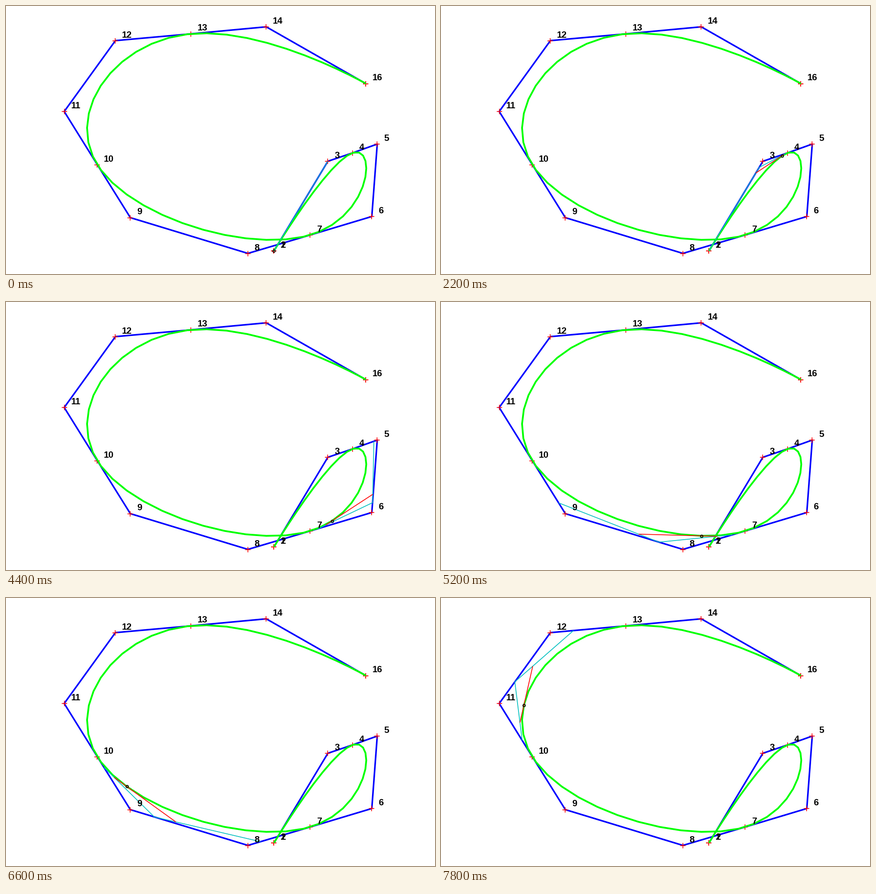
A matplotlib script that plays this animation: 947 by 592 pixels, repeating every 8000 ms.

```python
import matplotlib.pyplot as plt
import numpy as np
from matplotlib.animation import FuncAnimation

W, H, DPI = 947, 592, 64
FRAMES, INTERVAL = 40, 200
PX = 72 / DPI  # points per pixel

# Control points of five joined cubic Bezier pieces, in pixels
CTRL = np.array([
    (591, 540.5), (591, 540.5), (710, 342.5), (764.5, 324), (819, 304.5),
    (807, 464.5), (670.5, 505.5), (533.5, 546), (274, 467), (201, 350),
    (128, 232.5), (241, 76), (408, 61), (574, 45.5), (794, 171), (794, 171),
])
PIECES = (len(CTRL) - 1) // 3
PARAMS = np.linspace(0, PIECES, 60)


def reduce_once(pts, t):
    return (1 - t) * pts[:-1] + t * pts[1:]


def casteljau(s):
    """Construction points at global parameter s: 3, 2 and 1 of them."""
    piece = min(int(s), PIECES - 1)
    t = s - piece
    first = reduce_once(CTRL[3 * piece:3 * piece + 4], t)
    second = reduce_once(first, t)
    return first, second, reduce_once(second, t)


fig = plt.figure(figsize=(W / DPI, H / DPI), dpi=DPI, facecolor="white")
ax = fig.add_axes([0, 0, 1, 1])
ax.set_xlim(-0.5, W - 0.5)
ax.set_ylim(H - 0.5, -0.5)
ax.axis("off")


def line(pts, color, width, z):
    return ax.plot(pts[:, 0], pts[:, 1], color=color, lw=width * PX, zorder=z,
                   solid_joinstyle="round", solid_capstyle="butt")[0]


line(CTRL, "#0000ff", 3.5, 1)
ax.plot(CTRL[:, 0], CTRL[:, 1], ls="", marker="+", ms=12 * PX,
        mew=1.6 * PX, color="#ff0000", zorder=2)
line(np.array([casteljau(s)[2][0] for s in PARAMS]), "#00ff00", 3.9, 3)

for n, (x, y) in enumerate(CTRL, 1):
    if n == 15:  # covered by the last label
        continue
    dx = 20.2 if n < 10 else 25.3
    ax.text(x + dx, y - 7, str(n), ha="center", va="baseline", zorder=7,
            family="Liberation Sans", weight="bold", size=20 * PX)

outer = line(CTRL[:3], "#00bfbf", 1.7, 4)
inner = line(CTRL[:2], "#ff0000", 1.7, 5)
dot, = ax.plot([], [], ls="", marker="o", ms=5.5 * PX, mew=1.7 * PX,
               mfc="none", mec="black", zorder=6)


def update(k):
    for artist, pts in zip((outer, inner, dot), casteljau(PARAMS[k])):
        artist.set_data(pts[:, 0], pts[:, 1])
    return outer, inner, dot


anim = FuncAnimation(fig, update, frames=FRAMES, interval=INTERVAL,
                     init_func=lambda: update(0), repeat=True, repeat_delay=0)
plt.show()
```
